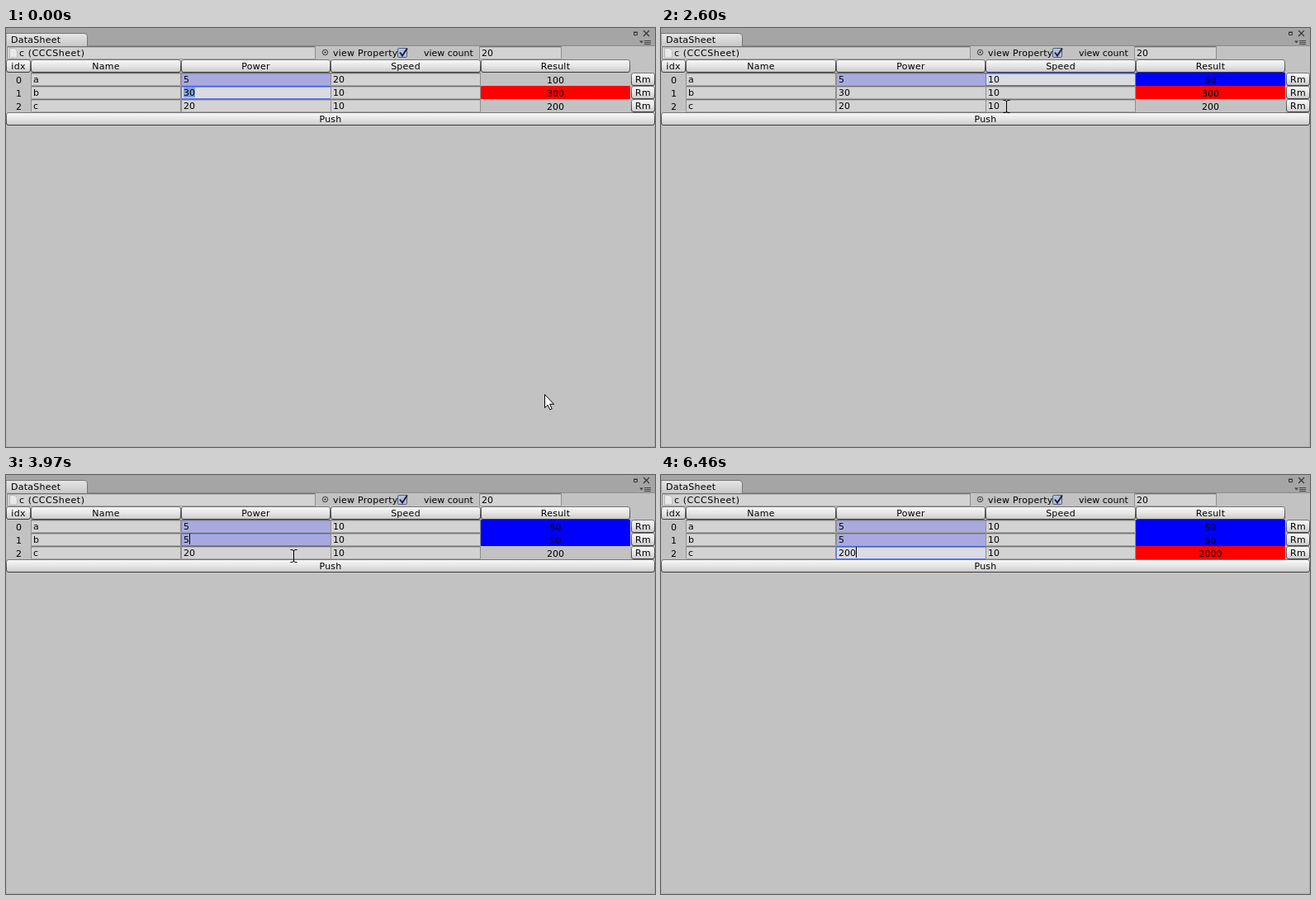
An HTML page for the animation above (7.26 s loop, 786 by 507 pixels).

```html
<!DOCTYPE html>
<html lang="en">
<head>
<meta charset="utf-8">
<title>DataSheet</title>
<style>
  html, body { margin: 0; width: 100%; height: 100%; overflow: hidden; background: #c2c2c2; }
  svg { display: block; }
  text { font: 11px "DejaVu Sans", Verdana, sans-serif; fill: #000; letter-spacing: .25px; white-space: pre; }
  .num { letter-spacing: 0; }
  .mid { text-anchor: middle; }
  rect { shape-rendering: crispEdges; }
  .btn { shape-rendering: auto; }
</style>
</head>
<body>
<svg id="stage" width="786" height="507" viewBox="0 0 786 507">
  <defs>
    <linearGradient id="face" x2="0" y2="1">
      <stop offset="0" stop-color="#f8f8f8"/><stop offset=".5" stop-color="#e6e6e6"/><stop offset="1" stop-color="#c9c9c9"/>
    </linearGradient>
    <linearGradient id="edge" x2="0" y2="1">
      <stop offset="0" stop-color="#777"/><stop offset="1" stop-color="#3c3c3c"/>
    </linearGradient>
    <linearGradient id="tab" x2="0" y2="1">
      <stop offset="0" stop-color="#e6e6e6"/><stop offset="1" stop-color="#c8c8c8"/>
    </linearGradient>
  </defs>
  <rect width="786" height="507" fill="#c2c2c2"/>
  <rect width="786" height="22" fill="#a5a5a5"/>
  <rect y="21" width="786" height="1" fill="#8b8b8b"/>
  <path d="M0 22V6.500H94Q98.500 6.500 98.500 11V22" fill="url(#tab)" stroke="#777"/>
  <text x="6" y="18">DataSheet</text>
  <path d="M760.500 5.500h4v3h-4zM760 5h5" fill="none" stroke="#333"/>
  <path d="M772 3l7 7M779 3l-7 7" stroke="#333" stroke-width="1.100"/>
  <path d="M767 15.500h5l-2.500 3z" fill="#444"/>
  <path d="M773 15.500h8M773 17.500h8M773 19.500h8" stroke="#444"/>
  <path d="M0 505.500V118M785.500 118V506M0 506.500H786" fill="none" stroke="#b0b0b0"/>
  <g id="sheet"></g>
  <path d="M4.500 24.500h6l3 3v8.500h-9z" fill="#e9e9e9" stroke="#bcbcbc"/>
  <text x="16" y="34" style="letter-spacing:.55px">c (CCCSheet)</text>
  <circle cx="386.500" cy="29.500" r="3.200" fill="none" stroke="#333"/>
  <circle cx="386.500" cy="29.500" r="1" fill="#222"/>
  <text x="396" y="34">view Property</text>
  <rect class="btn" x="474.500" y="24.500" width="11" height="11" rx="1.500" fill="#b4bfdc" stroke="#56607e"/>
  <path d="M477 29.500l3 4 6-9" fill="none" stroke="#1c2340" stroke-width="2"/>
  <text x="506" y="34" style="letter-spacing:0">view count</text>
  <text class="num" x="576" y="34">20</text>
  <g id="select"><rect width="14" height="12" fill="#829fd8"/><text class="num" y="10"></text></g>
  <rect id="caret" width="1" height="13" fill="#000"/>
  <path id="beam" d="M-4 -7.500h3M1 -7.500h3M-1 -6.500h2M0 -7V7M-1 6.500h2M-4 7.500h3M1 7.500h3" fill="none" stroke="#000"/>
  <path id="arrow" d="M0 0V16L3.600 12.700 6.300 18.300 8.700 17.200 6.100 11.700H11Z" fill="#fff" stroke="#000"/>
</svg>
<script>
const LOOP = 7260;
const $ = id => document.getElementById(id);
const sheet = $("sheet");

function add(tag, attrs, text) {
  const el = document.createElementNS("http://www.w3.org/2000/svg", tag);
  for (const key in attrs) el.setAttribute(key, attrs[key]);
  if (text !== undefined) el.textContent = text;
  return sheet.appendChild(el);
}
const box = (x, y, width, height, fill) => add("rect", { x, y, width, height, fill });
const label = (x, y, text, cls = "") => add("text", { x, y, class: cls }, text);

function button(x, y, w, text) {
  add("rect", { class: "btn", x: x + .5, y: y + .5, width: w - 1, height: 15, rx: 2.5,
    fill: "url(#face)", stroke: "url(#edge)" });
  label(x + w / 2, y + 12, text, "mid");
}

function field(x, y, w) {
  const fill = box(x, y, w, 16, "#d3d3d3");
  const sides = [
    box(x, y, w, 1, "#707070"), box(x, y + 1, w, 1, "#b4b4b4"),
    box(x, y, 1, 16, "#8e8e8e"), box(x + w - 1, y, 1, 16, "#8e8e8e"),
    box(x, y + 15, w, 1, "#a4a4a4")
  ];
  const plain = sides.map(s => s.getAttribute("fill"));
  const lit = ["#3f5be0", "#8292e6", "#6376dc", "#6376dc", "#5c72e4"];
  return (low, focus) => {
    fill.setAttribute("fill", low ? "#a9a9e0" : focus ? "#dadce2" : "#d3d3d3");
    sides.forEach((s, i) => s.setAttribute("fill",
      focus ? lit[i] : low && i == 1 ? "#9292c4" : plain[i]));
  };
}

const COLS = [212, 393];
field(1, 22, 374);
field(573, 22, 100);
[[0, 30, "idx"], [30, 182, "Name"], [212, 181, "Power"], [393, 182, "Speed"], [575, 181, "Result"]]
  .forEach(([x, w, text]) => button(x, 38, w, text));

const rows = ["a", "b", "c"].map((name, i) => {
  const y = 54 + i * 16;
  label(15.5, y + 13, i, "num mid");
  field(30, y, 182);
  label(33, y + 12, name);
  const cells = COLS.map(x => ({ paint: field(x, y, 181.5), text: label(x + 3, y + 12, "", "num") }));
  const back = box(575, y, 181, 16, "none");
  const result = label(665.5, y + 13, "", "num mid");
  button(757, y, 29, "Rm");
  return { cells, back, result };
});
button(0, 102, 786, "Push");

// time, row, column, mark (s: selection, c: caret), typed value
const EDITS = [
  [0, 1, 0, "s", "30"], [800, 0, 1, "s", "20"], [1580, 0, 1, "c", "1"],
  [1680, 0, 1, "c", "10"], [1830, 0, 1, "", "10"], [2910, 1, 0, "s", "30"],
  [3670, 1, 0, "c", "5"], [4300, 2, 0, "s", "20"], [4850, 2, 0, "c", "20"],
  [5690, 2, 0, "c", "200"]
];

// pointer runs: start, step in ms, then the shape and its stops
const RUNS = [
  [0, 74, "arrow", [652, 443], [622, 402], [535, 300], [450, 196], [429, 128], [428, 78]],
  [440, 150, "beam", [436, 58], [441, 62]],
  [880, 90, "beam", [450, 66], [456, 76]],
  [2380, 140, "beam", [464, 99], [452, 98]],
  [2600, 78, "beam", [418, 95], [375, 91], [336, 87], [308, 85], [296, 84], [293, 84]],
  [3290, 76, "beam", [295, 86], [300, 91], [308, 96]],
  [3520, 76, "arrow", [316, 103], [324, 105]],
  [3670, 76, "beam", [333, 101], [341, 100], [346, 99], [348, 98], [349, 97]],
  [4070, 80, "beam", [345, 94], [340, 91]],
  [4380, 76, "beam", [344, 95], [350, 99], [353, 101]],
  [4850, 80, "beam", [357, 100], [360, 98], [361, 96]],
  [5920, 80, "arrow", [361, 112], [362, 142], [362, 171]],
  [6230, 77, "arrow", [372, 200], [430, 265], [520, 345], [620, 490]]
];

const place = (el, x, y) => el.setAttribute("transform", `translate(${x} ${y})`);
const show = (el, on) => el.setAttribute("visibility", on ? "visible" : "hidden");

function drawSheet(t) {
  const values = [[5, 20], [30, 10], [20, 10]];
  let now;
  for (const edit of EDITS) {
    if (edit[0] > t) break;
    now = edit;
    values[edit[1]][edit[2]] = +edit[4];
  }
  const [, row, col, mark, text] = now;
  rows.forEach((r, i) => {
    r.cells.forEach((cell, j) => {
      cell.paint(j == 0 && values[i][j] < 10, i == row && j == col);
      cell.text.textContent = values[i][j];
    });
    const product = values[i][0] * values[i][1];
    r.result.textContent = product;
    r.back.setAttribute("fill", product < 100 ? "#00f" : product >= 300 ? "#f00" : "none");
  });
  const x = COLS[col] + 3, y = 54 + row * 16;
  const select = $("select");
  place(select, x, y + 2);
  select.lastChild.textContent = text;
  show(select, mark == "s");
  place($("caret"), x + 7 * text.length, y + 1);
  show($("caret"), mark == "c");
}

function drawPointer(t) {
  const [start, step, shape, ...stops] = RUNS.filter(r => r[0] <= t).pop();
  const [x, y] = stops[Math.min(stops.length - 1, Math.floor((t - start) / step))];
  const gone = t >= 6460;
  for (const id of ["beam", "arrow"]) show($(id), id == shape && !gone);
  place($(shape), x + .5, y + (shape == "arrow" ? .5 : 0));
}

const origin = performance.now();
function frame() {
  const t = Math.max(0, performance.now() - origin) % LOOP;
  drawSheet(t);
  drawPointer(t);
  requestAnimationFrame(frame);
}
frame();
</script>
</body>
</html>
```
